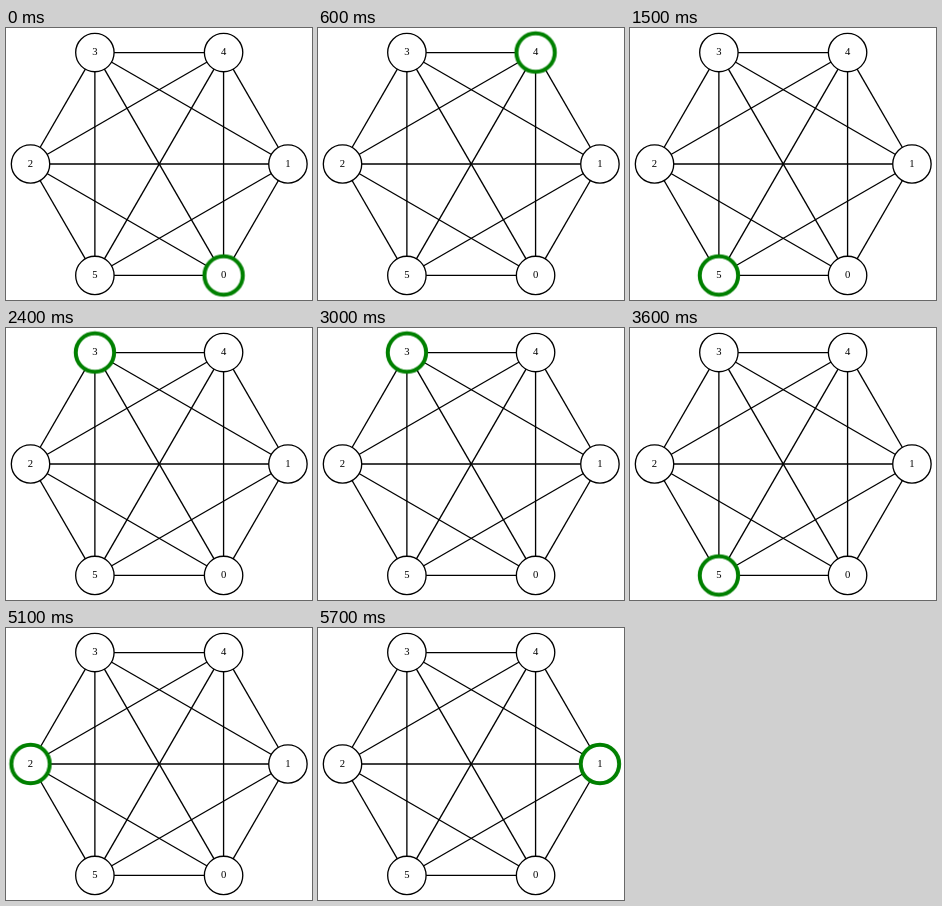
An HTML page that plays this animation: 306 px wide and 272 px high, repeating every 6 s.

```html
<!DOCTYPE html>
<html lang="en">
<head>
<meta charset="utf-8">
<title>Walk on a complete graph</title>
<style>
  html, body { margin: 0; width: 100%; height: 100%; overflow: hidden; background: #fff; }
  svg { display: block; }
  line, circle { stroke: #000; stroke-width: 1.333; }
  circle { fill: #fff; }
  .ring { fill: none; stroke: #008000; stroke-width: 4; }
  text { font: 10.667px "Liberation Serif", Times, serif; text-anchor: middle; }
</style>
</head>
<body>
<svg id="stage" width="306" height="272" viewBox="0 0 306 272"></svg>
<script>
const STEP = 300;
const WALK = [0, 3, 4, 0, 2, 5, 2, 0, 3, 0, 3, 2, 5, 2, 4, 2, 0, 2, 4, 1];
const CENTER = { x: 153.23, y: 136 };
const SPREAD = 128.7;
const NODE_RADIUS = 19.2;
const AROUND = [1, 4, 3, 2, 5, 0]; // counter-clockwise from the right

const stage = document.getElementById('stage');

function add(tag, attributes, content = '') {
  const element = document.createElementNS('http://www.w3.org/2000/svg', tag);
  for (const [key, value] of Object.entries(attributes)) element.setAttribute(key, value);
  element.textContent = content;
  return stage.appendChild(element);
}

const nodes = [];
AROUND.forEach((label, i) => {
  const angle = i * Math.PI / 3;
  nodes[label] = {
    x: CENTER.x + SPREAD * Math.cos(angle),
    y: CENTER.y - SPREAD * Math.sin(angle)
  };
});

nodes.forEach((a, i) => nodes.slice(i + 1).forEach(b =>
  add('line', { x1: a.x, y1: a.y, x2: b.x, y2: b.y })));

nodes.forEach(({ x, y }, label) => {
  add('circle', { cx: x, cy: y, r: NODE_RADIUS });
  add('text', { x, y: y + 2.7 }, label);
});

const ring = add('circle', { class: 'ring', r: NODE_RADIUS });
const keyframes = [...WALK, WALK[0]].map((label, i) => ({
  offset: i / WALK.length,
  transform: `translate(${nodes[label].x}px, ${nodes[label].y}px)`,
  easing: 'step-end'
}));
ring.animate(keyframes, { duration: STEP * WALK.length, iterations: Infinity });
</script>
</body>
</html>
```
